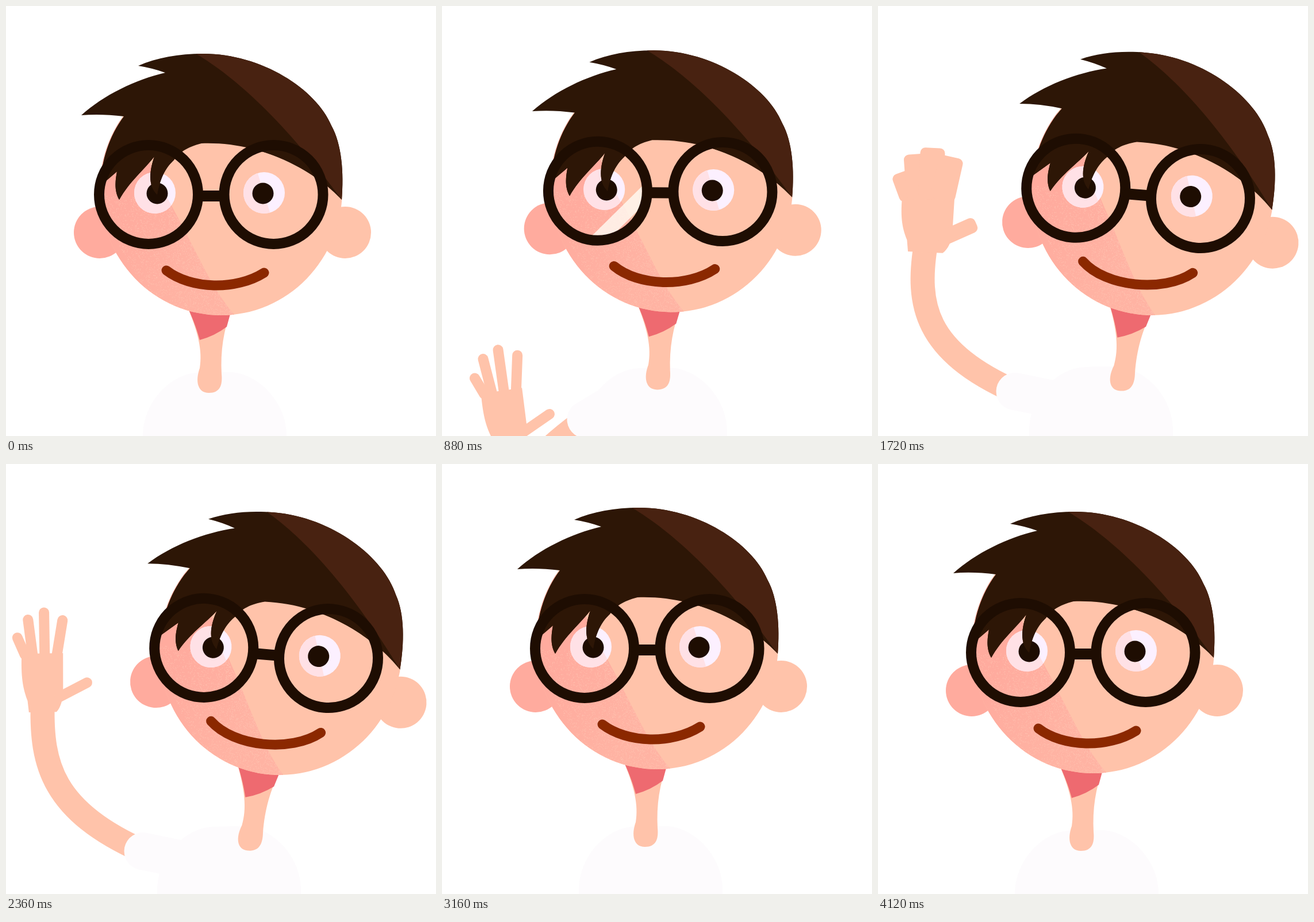
Write an HTML page with a canvas that moves like this. It is 748 px wide and 748 px high and loops after 4.16 s.

```html
<!DOCTYPE html>
<html lang="en">
<head>
<meta charset="utf-8">
<title>Waving boy</title>
<style>
  html, body { margin: 0; width: 100%; height: 100%; overflow: hidden; background: #fff; }
  canvas { display: block; width: 748px; height: 748px; }
</style>
</head>
<body>
<canvas id="stage" width="748" height="748"></canvas>
<script>
const ctx = document.getElementById('stage').getContext('2d');
const LOOP = 4160, STEP = 40, TAU = Math.PI * 2;
const SKIN = '#ffc3aa', SHADE = '#ffab9e', HAIR = '#2d1606', SHINE = '#482211',
      DARK = '#1e0d02', LIPS = '#8b2800', CHIN = '#ee6a70', SHIRT = '#fdfbfd',
      EYE = '#fcf0ff', EYE_SHADE = '#ffe1e6';

const circle = (x, y, rx, ry = rx) => {
  const p = new Path2D();
  p.ellipse(x, y, rx, ry, 0, 0, TAU);
  return p;
};

const shirt = new Path2D('M238 780V748C238 690 285 642 330 638Q362 636 392 637C440 640 488 690 488 748V780Z');
const neck = new Path2D('M312 515C335 568 342 600 337 630C329 652 333 673 353 673C372 673 377 660 375 640C373 600 378 565 393 525Z');
const neckShade = new Path2D('M312 515C329 552 334 570 337 581Q363 574 384 558L393 525Z');
const face = circle(374, 320, 211, 218);
const shade = new Path2D('M398 538C366 500 350 466 330 428Q300 368 262 300L220 200H100V560H398Z');
const hair = new Path2D(`M230 104C262 90 300 83 343 83C445 83 540 145 566 208C584 240 588 290 584 337
  C540 290 450 235 340 239C315 245 300 256 292 268C277 282 268 300 263 328C246 312 250 285 258 262
  C240 285 215 305 197 337C187 320 191 300 193 288L165 312C165 270 180 225 205 192Q165 187 131 190
  C170 155 225 128 277 116Q255 108 230 104Z`);
const hairShine = new Path2D('M325 80C394 119 484 199 584 337L620 337V60Z');
const eyes = [circle(259, 325, 36), circle(449, 325, 36)];
const pupils = [circle(263, 326, 18.5), circle(447, 326, 18.5)];
const rightEyeShade = new Path2D('M436 285L461 365H400V285Z');
const lenses = new Path2D();
lenses.addPath(circle(248, 328, 86));
lenses.addPath(circle(465.5, 328, 86));
const palm = new Path2D('M-35 -90C-37 -50 -34 -30 -26 -8L-24 12H24C32 4 35 -10 36 -20L37 -90Z');

// base x, base y, tip x, tip y, growth in width when the hand tilts
const fingers = [
  [-26, -80, -42, -118, 26], [-15, -80, -23, -149, 26], [5, -80, 5, -161, 26],
  [25, -80, 37, -147, 26], [22, -10, 78, -38, 9]
];

// shoulder, two curve controls, wrist, hand angle
const DOWN = [295, 790, 200, 960, 150, 1010, 150, 980, -10];
const LOW = [250, 725, 140, 800, 118, 880, 115, 764, -8];
const UP = [238, 675, 72, 594, 90, 510, 124, 419, 9];

// light grain that thickens towards the edge of the cheek shadow
let seed = 7;
const rand = () => (seed = seed * 16807 % 2147483647) / 2147483647;
const grain = new Path2D();
for (let i = 0; i < 3000; i++) {
  const y = 330 + 210 * rand();
  const edge = 275 + (y - 330) * 0.58;
  grain.rect(edge - 130 * rand() ** 1.5, y, 1, 1);
}

const mix = (a, b, u) => a.map((v, i) => v + (b[i] - v) * u);

function fill(color, ...paths) {
  ctx.fillStyle = color;
  paths.forEach(p => ctx.fill(p));
}

function group(draw, clip) {
  ctx.save();
  if (clip) ctx.clip(clip);
  draw();
  ctx.restore();
}

function line(color, width, path) {
  ctx.strokeStyle = color;
  ctx.lineWidth = width;
  ctx.stroke(path);
}

function drawHand(x, y, angle, tilt) {
  ctx.translate(x, y);
  ctx.rotate(angle * Math.PI / 180);
  group(() => {
    ctx.scale(1 + 0.27 * tilt, 1);
    fill(SKIN, palm);
  });
  for (const [x0, y0, x1, y1, grow] of fingers) group(() => {
    const dx = x1 - x0, dy = y1 - y0, w = 18 + grow * tilt;
    const p = new Path2D();
    p.roundRect(0, -w / 2, Math.hypot(dx, dy) + 9, w, 9);
    ctx.translate(x0, y0);
    ctx.rotate(Math.atan2(dy, dx));
    fill(SKIN, p);
  });
}

function drawHead(t, lean, smile) {
  const shift = 6 * lean;
  ctx.translate(shift, 0);
  fill(SHADE, circle(163, 394, 45));
  fill(SKIN, circle(590, 394, 45), face);
  group(() => {
    const g = ctx.createLinearGradient(190, 380, 330, 460);
    g.addColorStop(0, SHADE);
    g.addColorStop(1, '#ffb3a3');
    fill(g, shade);
    ctx.clip(shade);
    fill('rgba(255,205,185,.6)', grain);
  }, face);

  // light sweeping over the glasses
  ctx.translate(-shift, 0);
  const s = 440 + (t - 760) * 1.7;
  if (s > 400 && s < 930) group(() => {
    fill('rgba(255,250,242,.82)',
      new Path2D(`M${s - 200} 200L${s - 450} 450H${s - 415}L${s - 165} 200Z`));
  }, lenses);

  fill(EYE, ...eyes);
  group(() => fill(EYE_SHADE, shade), eyes[0]);
  group(() => fill(EYE_SHADE, rightEyeShade), eyes[1]);
  fill(DARK, ...pupils);
  const left = 279 - 9 * smile, right = 449 + 13 * smile, low = 493 + 2 * smile;
  line(LIPS, 17, new Path2D(
    `M${left} ${460 - 6 * smile}C${left + 43} ${low} ${right - 49} ${low + 2} ${right} ${464 - 6 * smile}`));

  ctx.translate(shift, 0);
  fill(HAIR, hair);
  group(() => fill(SHINE, hairShine), hair);
  group(() => {
    ctx.clip(lenses);
    fill(HAIR, hair);
  });
  ctx.translate(-shift - lean, 0);
  line(DARK, 18, lenses);
  line(DARK, 19, new Path2D('M340 330.5H374'));
}

function draw(t) {
  const part = (a, b) => Math.min(1, Math.max(0, (t - a) / (b - a)));
  const ease = (a, b) => 0.5 - 0.5 * Math.cos(Math.PI * part(a, b));

  const bob = -7 * (ease(0, 1250) - ease(1250, 2200) + ease(2200, 3160) - ease(3160, 4160));
  const back = ease(2460, 3150);
  const lean = ease(620, 1310) - back;
  const smile = ease(660, 1310) - back;
  const turn = 4.8 * smile - 1.2 * (ease(240, 600) - ease(660, 1310));

  const phase = TAU * (t - 1600) / 410, c = Math.cos(phase);
  const tilt = Math.max(0, Math.sin(phase)) * (ease(1220, 1460) - ease(2600, 2700));
  const wave = [238, 674, 80, 604, 65 - 6 * c, 522, 77 - 22 * c, 420, 1.5 - 4 * c];

  const rise = 1 - (1 - part(880, 1280)) ** 2;
  let arm = mix(DOWN, LOW, part(620, 880) ** 2);
  arm = mix(arm, mix(UP, wave, ease(1260, 1440)), rise);
  arm = mix(arm, LOW, part(2680, 2940) ** 2);
  arm = mix(arm, DOWN, part(2940, 3100));
  const arc = 45 * Math.sin(Math.PI * rise);
  const [sx, sy, ax, ay, bx, by, wx, wy, angle] = arm;

  ctx.setTransform(1, 0, 0, 1, 0, 0);
  fill('#fff', new Path2D('M0 0H748V748H0Z'));
  ctx.translate(0, bob);
  ctx.lineCap = 'round';

  line(SKIN, 42, new Path2D(`M${sx} ${sy}C${ax} ${ay} ${bx - arc} ${by} ${wx - arc} ${wy}`));
  group(() => drawHand(wx - arc, wy, angle, tilt));
  line(SHIRT, 65, new Path2D(`M${sx} ${sy}L${305 + 12 * lean} 690`));
  group(() => {
    ctx.translate(25 * lean, -6 * lean);
    fill(SHIRT, shirt);
  });

  group(() => {
    ctx.translate(353 + 68 * lean, 673);
    ctx.rotate(turn * Math.PI / 180);
    group(() => {
      ctx.transform(1, 0, -0.04 * lean, 1, 0, 0);
      ctx.translate(-353, -673);
      fill(SKIN, neck);
      fill(CHIN, neckShade);
    });
    ctx.translate(-353, -673);
    drawHead(t, lean, smile);
  });
}

const start = performance.now();
function tick() {
  const t = (performance.now() - start) % LOOP;
  draw(Math.floor(t / STEP) * STEP);
  requestAnimationFrame(tick);
}
tick();
</script>
</body>
</html>
```
